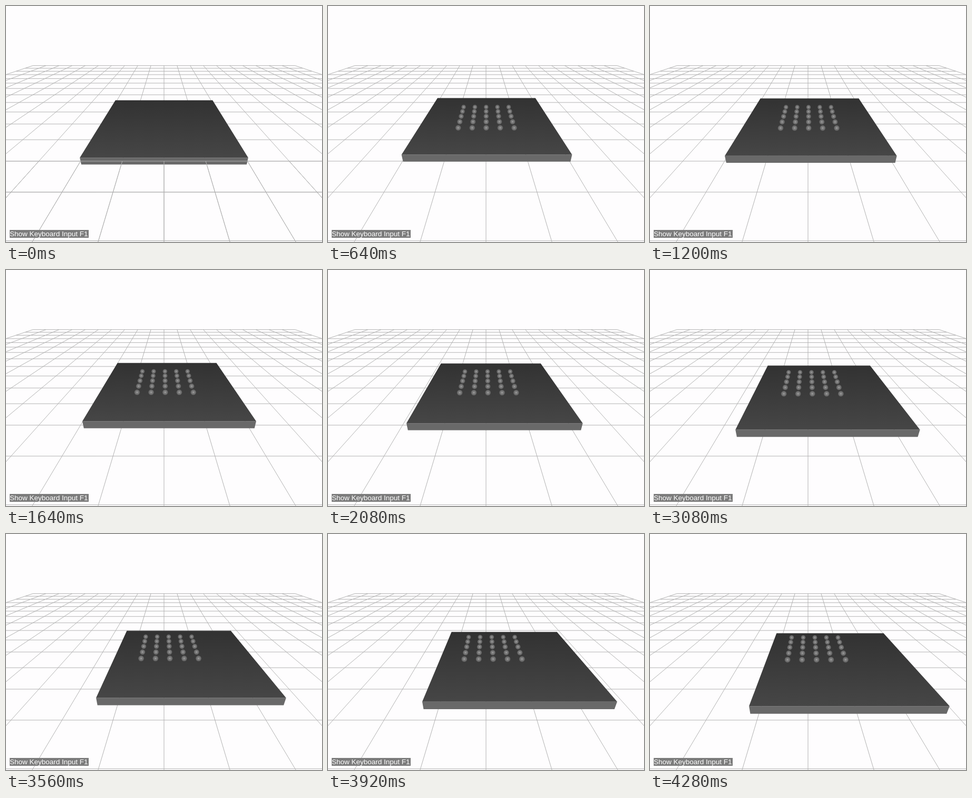
An HTML page with a canvas that plays this animation: 600 by 450 pixels, repeating every 4320 ms.

```html
<!DOCTYPE html>
<html lang="en">
<head>
<meta charset="utf-8">
<title>Plate and spheres</title>
<style>
  html, body { margin: 0; width: 100%; height: 100%; overflow: hidden; background: #fefdfe; }
  canvas { display: block; }
  #hint {
    position: absolute; left: 7px; top: 427px; width: 150px; height: 15px;
    background: #7c7c7c; color: #fff; white-space: nowrap;
    font: 13.5px/15px "Liberation Sans", Arial, sans-serif;
  }
</style>
</head>
<body>
<canvas id="stage" width="600" height="450"></canvas>
<div id="hint">Show Keyboard Input F1</div>
<script>
const ctx = document.getElementById('stage').getContext('2d');
const LOOP = 4320, STEP = 40;
const FOCAL = 225 / Math.tan(Math.PI / 6);   // 60 degree vertical field of view
const SIN = 1 / Math.sqrt(5), COS = 2 * SIN; // camera at (0, 3, 6) looking at the origin
const HALF = 2, THICK = 0.2, RADIUS = 0.08, GAP = 0.4;

function project(x, y, z) {
  const a = 6 - z, b = y - 3;
  const scale = FOCAL / (COS * a - SIN * b);
  return { x: 300 + x * scale, y: 225 - (SIN * a + COS * b) * scale, scale };
}

function tracePath(points) {
  ctx.beginPath();
  for (const p of points) ctx.lineTo(p.x, p.y);
}

function fillQuad(points, style) {
  tracePath(points);
  ctx.fillStyle = style;
  ctx.fill();
}

function line(x1, z1, x2, z2) {
  tracePath([project(x1, 0, z1), project(x2, 0, z2)]);
  ctx.stroke();
}

function drawGrid(from) {
  ctx.strokeStyle = '#b2b2b2';
  ctx.lineWidth = 1;
  for (let z = from; z <= 4; z++) line(-10, z, 10, z);
  for (let x = -10; x <= 10; x++) line(x, from, x, 5);
}

function drawPlate(shift, y) {
  const corner = (sx, sy, sz) =>
    project(shift + sx * HALF, y + sy * THICK / 2, shift + sz * HALF);
  const backL = corner(-1, 1, -1), frontL = corner(-1, 1, 1), frontR = corner(1, 1, 1);
  const shade = ctx.createLinearGradient(0, backL.y, 0, frontL.y);
  shade.addColorStop(0, '#323232');
  shade.addColorStop(1, '#464646');
  fillQuad([frontL, frontR, corner(1, -1, 1), corner(-1, -1, 1)], '#696969');
  fillQuad([backL, corner(1, 1, -1), frontR, frontL], shade);
}

function drawBall(x, y, z) {
  const p = project(x, y, z), r = RADIUS * p.scale;
  const shade = ctx.createRadialGradient(p.x, p.y, 0, p.x, p.y, r);
  shade.addColorStop(0, '#b4b4b4');
  shade.addColorStop(0.25, '#868686');
  shade.addColorStop(0.8, '#696969');
  shade.addColorStop(1, '#555');
  ctx.fillStyle = shade;
  ctx.beginPath();
  ctx.arc(p.x, p.y, r, 0, 2 * Math.PI);
  ctx.fill();
}

function draw(t) {
  const shift = 0.045 * t * t;       // plate slides with constant acceleration
  const roll = shift * 2 / 7;        // solid spheres rolling on an accelerating plate
  const plateY = Math.min(THICK / 2, 2 * t);
  const top = plateY + THICK / 2;
  const hop = 3.43 * t - 4.9 * t * t;
  const ballY = t < 0.35 ? hop : Math.max(THICK + RADIUS, hop);

  ctx.fillStyle = '#fefdfe';
  ctx.fillRect(0, 0, 600, 450);
  drawGrid(-10);
  drawPlate(shift, plateY);
  if (plateY < THICK / 2) drawGrid(HALF); // ground still cuts through the plate
  if (ballY < top) return;
  for (let row = -2; row <= 2; row++)
    for (let col = -2; col <= 2; col++)
      drawBall(roll + col * GAP, ballY, roll + row * GAP);
}

const start = performance.now();
function tick() {
  const ms = (performance.now() - start) % LOOP;
  draw(Math.floor(ms / STEP) * STEP / 1000);
  requestAnimationFrame(tick);
}
tick();
</script>
</body>
</html>
```
